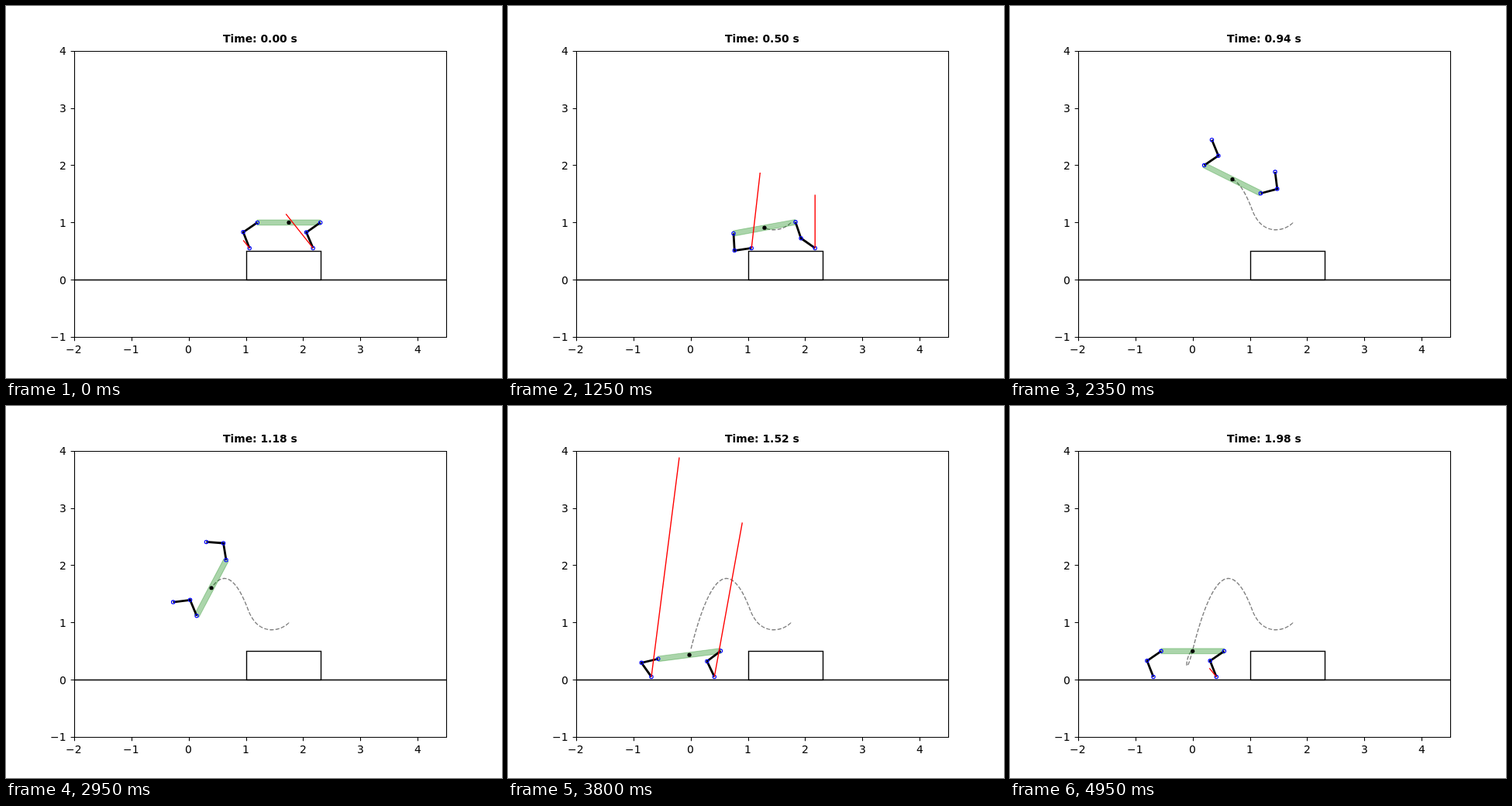
Animation, 640 px wide and 480 px high, one loop 5 s. Source, as an HTML page:

```html
<!DOCTYPE html>
<html lang="en">
<head>
<meta charset="utf-8">
<title>Backflip</title>
<style>
html, body { margin: 0; height: 100%; overflow: hidden; background: #fff; }
svg { display: block; width: 100%; height: 100%; }
text { font: 13.89px "DejaVu Sans", sans-serif; }
#title { font-weight: bold; }
</style>
</head>
<body>
<svg viewBox="0 0 640 480">
  <rect width="640" height="480" fill="#fff"/>
  <g id="axes" fill="none" stroke="#000" stroke-width="1.11"></g>
  <g id="labels"></g>
  <g fill="none" stroke="#000" stroke-width="1.39">
    <path d="M88.5 353.5H568.5"/>
    <rect x="310.5" y="316.5" width="96" height="37"/>
  </g>
  <path id="trail" fill="none" stroke="#808080" stroke-width="1.39" stroke-dasharray="5.14 2.22"/>
  <rect id="body" x="-40.66" y="-3.4" width="81.32" height="6.8" fill="#008000" fill-opacity=".33"
    stroke="#008000" stroke-opacity=".3"/>
  <path id="legs" fill="none" stroke="#000" stroke-width="2.78" stroke-linejoin="round"/>
  <g id="joints" fill="none" stroke="#00f" stroke-width="1.1"></g>
  <circle id="com" r="2.6"/>
  <path id="forces" fill="none" stroke="#f00" stroke-width="1.39"/>
  <text id="title" x="280" y="47"></text>
</svg>
<script>
const $ = id => document.getElementById(id);
const UNIT = 73.92, X0 = 235.6, Y0 = 353.28;
const HALF = 40.66, LINK = 22.1;
const FRAMES = 100, STEP = 50, TAKEOFF = 33, LANDING = 75, LAST = FRAMES - 1;
const mix = (a, b, u) => a + (b - a) * u;

// Axes
const snap = v => Math.round(v) + 0.5;
let ticks = 'M88.5 58.5H568.5V427.5H88.5Z', labels = '';
function label(v, x, y, align) {
  const width = v < 0 ? 21 : 9;
  labels += `<text x="${Math.round(x - width * align)}" y="${Math.round(y)}">${v < 0 ? '\u2212' : ''}${Math.abs(v)}</text>`;
}
for (let v = -2; v <= 4; v++) {
  const x = X0 + v * UNIT;
  ticks += `M${snap(x)} 427.5v4.86`;
  label(v, x, 448, 0.5);
}
for (let v = -1; v <= 4; v++) {
  const y = Y0 - v * UNIT;
  ticks += `M88.5 ${snap(y)}h-4.86`;
  label(v, 78, y + 5.25, 1);
}
$('axes').innerHTML = `<path d="${ticks}"/>`;
$('labels').innerHTML = labels;
$('joints').innerHTML = '<circle r="2.2"/>'.repeat(6);
const joints = [...$('joints').children];

// Each phase gives the body's x, y and angle in degrees
function stance(n) {
  const u = n / TAKEOFF;
  const push = (a, b, c) => u * u * (a + u * (b + u * c));
  return [365 + push(-30.8, -87.6, 66), 279.4 + push(53, -9, -60), push(-91, 150, -8)];
}

function flight(n) {
  const t = n - TAKEOFF, s = n - 49.8;
  return [281.9 - 1.83 * s, 222.5 + 0.145 * s * s, 51 + 7.3 * t + 0.002 * t * t];
}

function settle(n) {
  const t = n - LANDING, u = t / (LAST - LANDING);
  const speed = [-1.83, 7.3, 7.6], damping = [1.6, 2.7, 5], rest = [235.7, 316.3, 360];
  return flight(LANDING).map((v, k) => mix(v, rest[k], u) + speed[k] * t * (1 - u) ** damping[k]);
}

const pose = n => (n < TAKEOFF ? stance : n < LANDING ? flight : settle)(n);

// power: easing of the take-off force in x and y; ease and tuck: swing in the air
const legs = [
  { side: -1, start: [314.2, 312.4], end: [185, 349.4], lift: TAKEOFF, ease: 2, tuck: 0,
    push: [[-8, -10], [50, -154]], power: [4, 1.8], brake: [[36, -283], [0, 0]] },
  { side: 1, start: [396.2, 312.4], end: [266.3, 349.4], lift: 25, ease: 1, tuck: 6,
    push: [[-35, -44], [0, -69]], power: [1, 1], brake: [[36, -199], [-9, -11]] }
];

// Turn a vector by the body's angle, counter-clockwise on screen
function turn([x, y], deg) {
  const a = deg * Math.PI / 180, c = Math.cos(a), s = Math.sin(a);
  return [x * c + y * s, y * c - x * s];
}

function hipAt(leg, [x, y, deg]) {
  const [dx, dy] = turn([leg.side * HALF, 0], deg);
  return [x + dx, y + dy];
}

// Foot relative to the hip, in the body's own frame
function reach(leg, foot, n) {
  const p = pose(n), hip = hipAt(leg, p);
  return turn([foot[0] - hip[0], foot[1] - hip[1]], -p[2]);
}

function swing(leg, n) {
  const s = (n - leg.lift) / (LANDING - leg.lift), u = 1 - (1 - s) ** leg.ease;
  const from = reach(leg, leg.start, leg.lift), to = reach(leg, leg.end, LANDING);
  const q = s / 0.16;
  return [mix(from[0], to[0], u), mix(from[1], to[1], u) - leg.tuck * q * Math.exp(1 - q)];
}

function force(leg, n) {
  if (n <= leg.lift) {
    const [a, b] = leg.push;
    return a.map((v, k) => mix(v, b[k], (n / leg.lift) ** leg.power[k]));
  }
  const [a, b] = leg.brake, u = Math.max(0, (n - LANDING - 1) / (LAST - LANDING - 1));
  return a.map((v, k) => mix(b[k], v, (1 - u) ** 4));
}

function knee([hx, hy], [fx, fy]) {
  const dx = fx - hx, dy = fy - hy, d = Math.hypot(dx, dy);
  const h = Math.sqrt(Math.max(0, LINK * LINK - d * d / 4)) / d;
  return [(hx + fx) / 2 - dy * h, (hy + fy) / 2 + dx * h];
}

const path = Array.from({ length: FRAMES }, (_, n) => pose(n));
const line = pts => 'M' + pts.map(([x, y]) => `${x.toFixed(2)} ${y.toFixed(2)}`).join('L');

function draw(n) {
  const [x, y, deg] = path[n];
  let limbs = '', arrows = '';
  legs.forEach((leg, i) => {
    const hip = hipAt(leg, path[n]);
    const planted = n <= leg.lift || n >= LANDING;
    let foot = n <= leg.lift ? leg.start : leg.end;
    if (planted) {
      const [u, v] = force(leg, n);
      arrows += line([foot, [foot[0] + u, foot[1] + v]]);
    } else {
      const [u, v] = turn(swing(leg, n), deg);
      foot = [hip[0] + u, hip[1] + v];
    }
    const chain = [hip, knee(hip, foot), foot];
    limbs += line(chain);
    chain.forEach(([cx, cy], k) => {
      joints[i * 3 + k].setAttribute('cx', cx);
      joints[i * 3 + k].setAttribute('cy', cy);
    });
  });
  $('legs').setAttribute('d', limbs);
  $('forces').setAttribute('d', arrows);
  $('trail').setAttribute('d', n > 1 ? line(path.slice(0, n)) : '');
  $('body').setAttribute('transform', `translate(${x} ${y}) rotate(${-deg})`);
  $('com').setAttribute('cx', x);
  $('com').setAttribute('cy', y);
  $('title').textContent = `Time: ${(n * 0.02).toFixed(2)} s`;
}

const begin = performance.now();
function tick() {
  draw(Math.floor((performance.now() - begin) / STEP) % FRAMES);
  requestAnimationFrame(tick);
}
tick();
</script>
</body>
</html>
```
